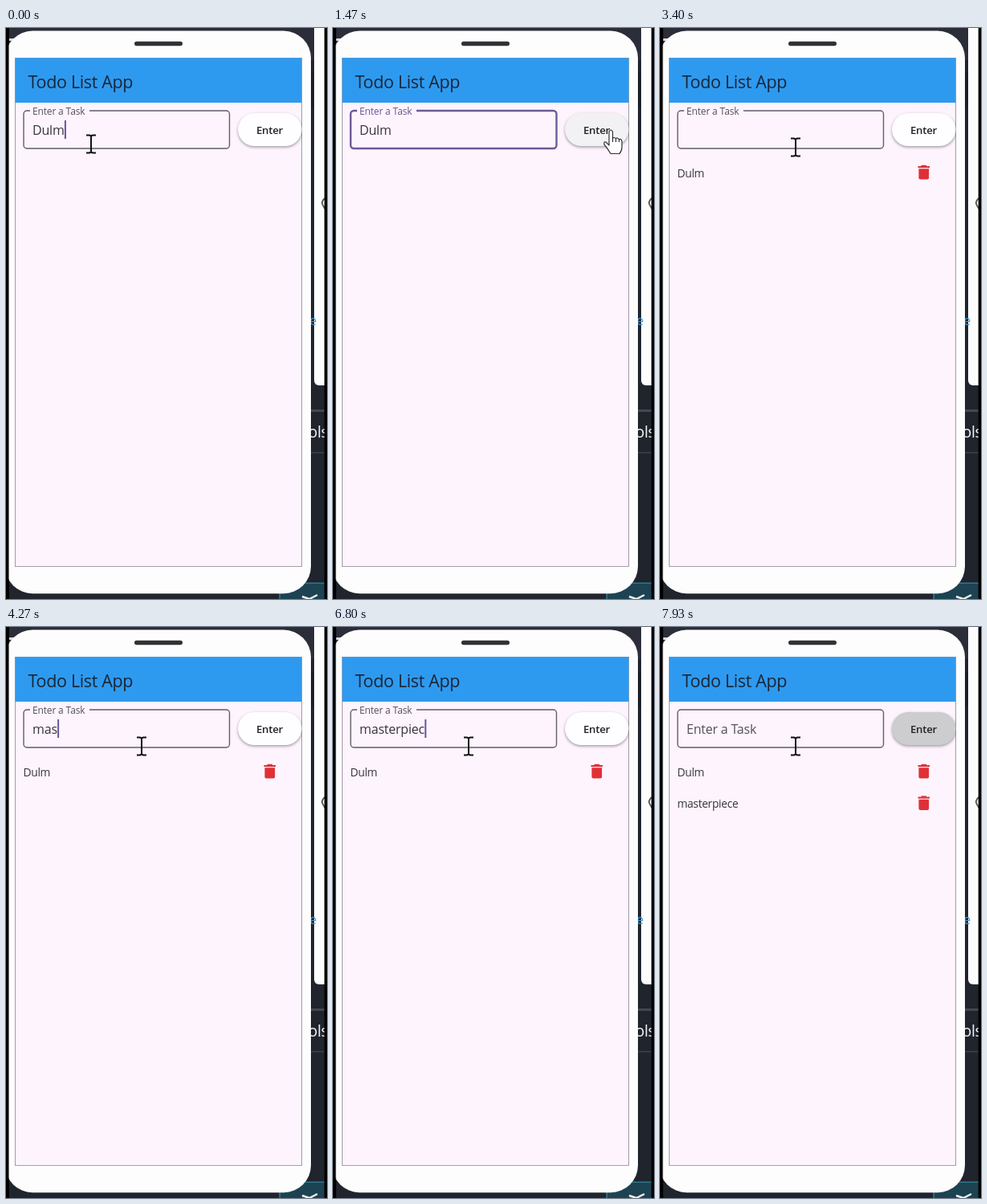
Recreate the animation shown at these times as an HTML page with a canvas. Size 400 by 711 pixels, loop 8 s.

```html
<!DOCTYPE html>
<html lang="en">
<head>
<meta charset="utf-8">
<title>Todo List App</title>
<style>
  html, body { margin: 0; width: 100%; height: 100%; overflow: hidden; background: #000; }
  canvas { display: block; width: 100vw; height: 100vh; }
</style>
</head>
<body>
<canvas id="stage"></canvas>
<script>
const W = 400, H = 711, LOOP = 8000;
const FONT = '"Open Sans", "Noto Sans", sans-serif';
const canvas = document.getElementById('stage');
const c = canvas.getContext('2d');
const ratio = window.devicePixelRatio || 1;
canvas.width = W * ratio;
canvas.height = H * ratio;

const FIRST = 'Dulm', SECOND = 'masterpiece';
const SUBMIT_1 = 1950, FOCUS = 2740, SUBMIT_2 = 7870;
const KEY_TIMES = [3600, 3830, 4060, 4500, 4760, 5020, 5280, 5470, 6180, 6480, 7080];
const TAB = 7530;

// Pointer stops: time, x, y
const POINTER = [
  [0, 106, 144.5], [930, 106, 144.5], [1330, 346, 128], [2030, 346, 128],
  [2480, 172, 149.5], [2750, 172, 149.5], [3000, 169, 148.5], [LOOP, 169, 148.5]
];

const clamp = v => Math.max(0, Math.min(1, v));
const ease = v => { v = clamp(v); return v * v * (3 - 2 * v); };
const mix = (a, b, k) => a + (b - a) * k;

function rect(x, y, w, h, color) {
  c.fillStyle = color;
  c.fillRect(x, y, w, h);
}

function roundPath(x, y, w, h, r) {
  c.beginPath();
  c.roundRect(x, y, w, h, r);
}

function roundFill(x, y, w, h, r, color) {
  roundPath(x, y, w, h, r);
  c.fillStyle = color;
  c.fill();
}

function stroke(color, width) {
  c.strokeStyle = color;
  c.lineWidth = width;
  c.stroke();
}

// Draws text and returns its advance width
function text(str, x, y, size, color, spacing = 0, weight = 400) {
  c.font = `${weight} ${size}px ${FONT}`;
  c.letterSpacing = spacing + 'px';
  c.fillStyle = color;
  c.fillText(str, x, y);
  return c.measureText(str).width;
}

function drawDesktop() {
  rect(0, 0, W, H, '#000');
  rect(4, 0, 393, H, '#20242d');
  rect(4, 0, 393, 40, '#2b2d38');
  rect(4, 13, 8, 3, '#d8d8dc');
  rect(375, 56, 22, 43, '#1b1f27');
  roundFill(384, -10, 24, 455, 6, '#fdfdfd');
  c.beginPath();
  c.moveTo(397, 212);
  c.quadraticCurveTo(392, 217, 395, 221);
  c.lineTo(398, 226);
  stroke('#555', 1.8);
  text('e', 378, 370, 16.5, '#3f9be0', 0, 500);
  rect(375, 475, 22, 3, '#44474d');
  rect(375, 528, 22, 1.5, '#3c4048');
  text('ols', 376.5, 510, 19.5, '#f6f6f6', -0.4, 500);
  rect(340.5, 691, 57, 20, '#1d4353');
  rect(340.5, 690.5, 57, 1.3, '#34809a');
  rect(340.5, 690.5, 1.3, 21, '#34809a');
  c.beginPath();
  c.moveTo(369, 708); c.lineTo(378, 711);
  c.moveTo(378, 711); c.lineTo(388, 706);
  stroke('#f0f0f0', 2.4);
  rect(396.7, 0, 4, H, '#000');
}

function drawPhone() {
  roundFill(-1, 3.6, 381, 700.6, 34, '#fefdfe');
  rect(0, 0, 3.5, H, '#000');
  roundFill(160, 16.8, 60, 5.4, 2.7, '#333135');
  rect(11, 37, 358, 634, '#fdf4fe');
  c.beginPath();
  c.rect(11.5, 37.5, 357, 633);
  stroke('rgba(95, 90, 102, .55)', 1.1);
  rect(11.5, 37.3, 357, 55.7, '#2e9aef');
  text('Todo List App', 27.5, 74.5, 21.5, '#182637', -0.34);
}

function drawButton(t, hover) {
  const pressed = t > 1830 && t < 2030;
  const fill = t >= TAB ? '#cdcccf' : pressed ? '#dcdbde' : hover ? '#f2f1f4' : '#fefdff';
  c.save();
  c.beginPath();
  c.rect(280, 94, 89, 70);
  c.clip();
  c.shadowColor = 'rgba(0, 0, 0, .38)';
  c.shadowBlur = 3.5 * ratio;
  c.shadowOffsetY = 1.6 * ratio;
  roundFill(289, 106, 79.5, 41, 20.5, fill);
  c.restore();
  text('Enter', 312, 132.3, 13.2, '#232126', -0.25, 600);
}

function fieldText(t) {
  if (t < SUBMIT_1) return FIRST;
  if (t >= SUBMIT_2) return '';
  return SECOND.slice(0, KEY_TIMES.filter(k => t >= k).length);
}

function caretShown(t) {
  if (t < SUBMIT_1) return (t + 200) % 1000 < 500;
  if (t < FOCUS || t >= TAB) return false;
  const last = KEY_TIMES.filter(k => t >= k).pop() || FOCUS;
  return (t - last) % 1000 < 500;
}

// 1 = label floats on the border, 0 = label rests inside the field
function labelFloat(t) {
  if (t < SUBMIT_1) return 1;
  if (t < FOCUS) return 1 - ease((t - SUBMIT_1) / 167);
  if (t < SUBMIT_2) return ease((t - FOCUS) / 167);
  return 1 - ease((t - SUBMIT_2) / 50);
}

function drawField(t, hover) {
  const active = !hover && t < SUBMIT_1;
  const up = labelFloat(t);
  roundPath(22, 103, 256.5, 47, 4);
  stroke(active ? '#6c5b95' : '#625d66', active ? 2.4 : 1.4);
  if (up > 0) rect(67 - 37 * up, 101, 74 * up, 4, '#fdf4fe');
  text('Enter a Task', 33, mix(133.4, 108, up), mix(16, 12, up),
    active ? '#68568f' : '#545058', mix(-0.2, -0.15, up));
  const width = text(fieldText(t), 33, 133.4, 16, '#38343c', -0.2);
  if (caretShown(t)) rect(33 + width + 0.3, 115, 2, 23, '#68569a');
}

function drawTask(label, y) {
  text(label, 21.5, y + 5.3, 13.8, '#38343c', -0.32);
  const red = '#df3036';
  rect(321.5, y - 8.5, 14.5, 2.1, red);
  rect(325.5, y - 9.7, 6.5, 1.5, red);
  roundFill(322.4, y - 5.3, 12.7, 13.2, [0, 0, 2, 2], red);
}

function pointerAt(t) {
  const i = POINTER.findIndex(p => p[0] > t);
  const [t0, x0, y0] = POINTER[i - 1], [t1, x1, y1] = POINTER[i];
  const k = ease((t - t0) / (t1 - t0));
  return { x: mix(x0, x1, k), y: mix(y0, y1, k) };
}

function drawBeam() {
  c.beginPath();
  for (const end of [-1, 1]) {
    c.moveTo(-6, 11 * end);
    c.lineTo(-2, 11 * end);
    c.lineTo(0, 10 * end);
    c.lineTo(2, 11 * end);
    c.lineTo(6, 11 * end);
  }
  c.moveTo(0, -10);
  c.lineTo(0, 10);
  stroke('#111', 2);
}

const HAND = new Path2D('M-2 1Q0-3 2.5 1V10Q4 6.5 6.5 10Q8.5 7.5 10.5 11Q13 9 14 13' +
  'V20Q14 25 11 28.5H0Q-3 23-8 17Q-9 13-6 14L-2 18Z');
const ARROW = new Path2D('M0 0V20L5 16L8 23L11 22L8 15H14Z');

function drawPointer({ x, y }) {
  c.save();
  c.translate(x, y);
  if (x < 279) drawBeam();
  else {
    const shape = x > 290 ? HAND : ARROW;
    c.fillStyle = '#fff';
    c.fill(shape);
    c.strokeStyle = '#333';
    c.lineWidth = 1.2;
    c.lineJoin = 'round';
    c.stroke(shape);
    if (shape === HAND) {
      c.beginPath();
      for (const kx of [2.5, 6.5, 10.5]) { c.moveTo(kx, 10); c.lineTo(kx, 14); }
      c.stroke();
    }
  }
  c.restore();
}

function draw(t) {
  c.setTransform(ratio, 0, 0, ratio, 0, 0);
  const p = pointerAt(t);
  drawDesktop();
  drawPhone();
  drawField(t, p.x < 279);
  drawButton(t, p.x > 289);
  if (t >= SUBMIT_1) drawTask(FIRST, 180.5);
  if (t >= SUBMIT_2) drawTask(SECOND, 220);
  drawPointer(p);
}

const start = performance.now();
function tick() {
  draw((performance.now() - start) % LOOP);
  requestAnimationFrame(tick);
}
tick();
</script>
</body>
</html>
```
